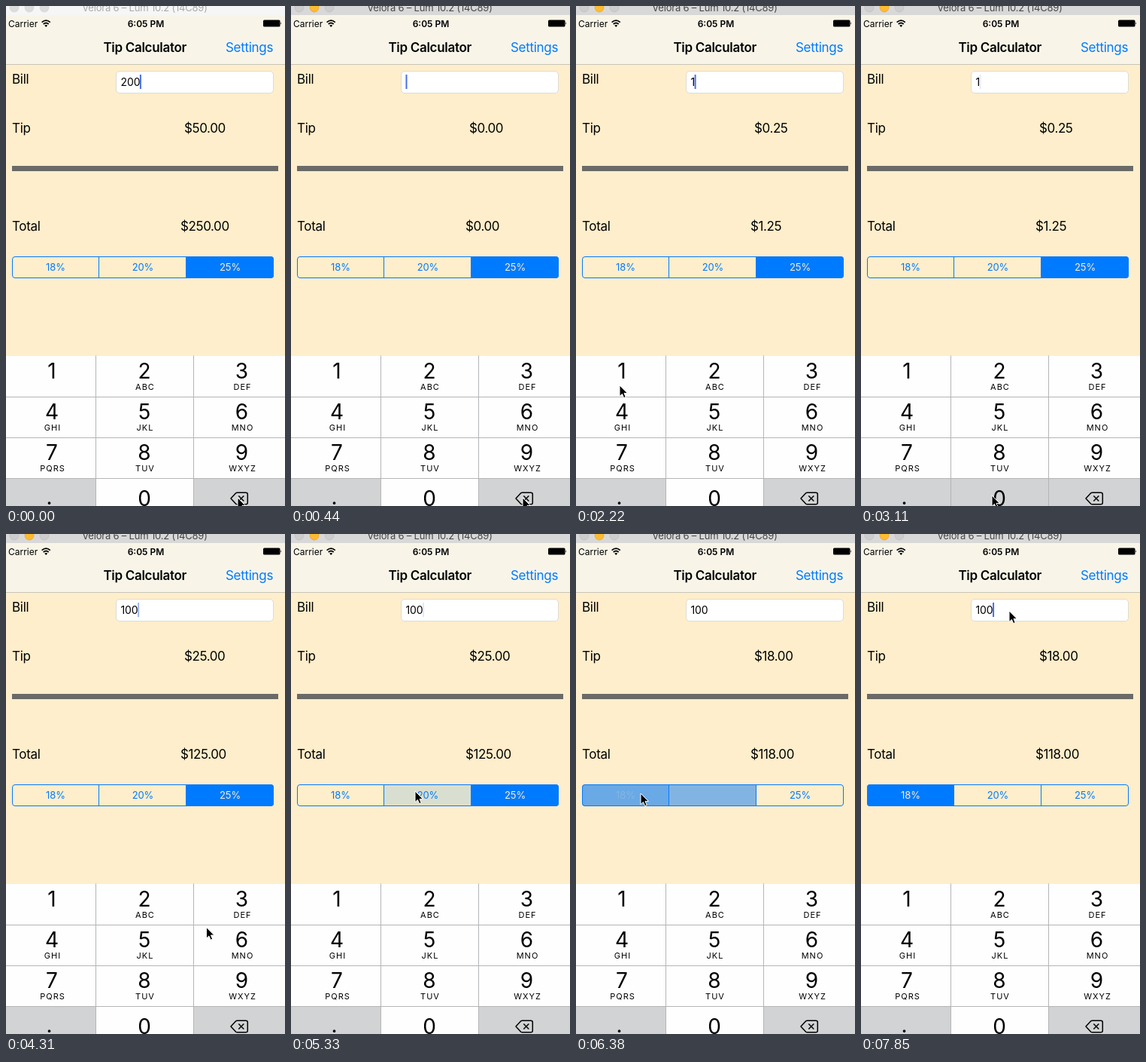
Animation, 371 px wide and 663 px high, one loop 8 s. Source, as an HTML page:

```html
<!DOCTYPE html>
<html lang="en">
<head>
<meta charset="utf-8">
<title>Tip Calculator</title>
<style>
html, body { margin: 0; width: 100%; height: 100%; overflow: hidden; background: #feeecb; }
svg { display: block; width: 371px; height: 663px; }
text { font: 17px Inter, Roboto, sans-serif; letter-spacing: -.3px; fill: #000; white-space: pre; }
.mid { text-anchor: middle; }
#title { font-size: 13px; letter-spacing: -.2px; }
.status { font-size: 12px; letter-spacing: 0; }
.bold { font-weight: 600; }
.money { letter-spacing: -.4px; }
#bill { font-size: 14px; letter-spacing: -.1px; }
.seg { font-size: 13px; letter-spacing: -.1px; }
.digit { font-size: 28px; letter-spacing: 0; }
.letters { font-size: 11px; letter-spacing: 1px; }
</style>
</head>
<body>
<svg viewBox="0 0 371 663">
  <rect width="371" height="663" fill="#feeecb"/>
  <rect id="bar" width="371" height="13"/>
  <g id="dots" stroke-width=".6"></g>
  <text id="title" class="mid" x="184.5" y="7">Velora 6 – Lum 10.2 (14C89)</text>
  <rect y="12" width="371" height="65" fill="#f8f5e8"/>
  <rect y="77" width="371" height="1" fill="#c8c4b5"/>

  <text class="status" x="3" y="27.5">Carrier</text>
  <g fill="none" stroke="#000" stroke-width="1.7">
    <path d="M47.6 21.6Q53.2 16.8 58.8 21.6M49.7 24Q53.2 21 56.7 24"/>
    <path d="M53.2 28L51.2 25.8Q53.2 24.2 55.2 25.8Z" fill="#000" stroke="none"/>
  </g>
  <text class="status bold mid" x="186" y="27.5">6:05 PM</text>
  <rect x="342" y="18.5" width="22.5" height="9" rx="1.5"/>
  <path d="M365.3 21.3q1.8 1.7 0 3.4z"/>
  <text class="bold mid" x="184.7" y="61">Tip Calculator</text>
  <text x="292" y="61" style="fill:#007aff">Settings</text>

  <text x="8" y="103">Bill</text>
  <text x="8" y="168">Tip</text>
  <text x="8" y="298">Total</text>
  <rect x="146.5" y="86.5" width="209" height="29" rx="4.5" fill="#fff" stroke="#dedbd2"/>
  <text id="bill" x="152.5" y="105.5"></text>
  <rect id="caret" y="91" width="2" height="19" fill="#4a6fe3"/>
  <text id="tip" class="money" x="237" y="168"></text>
  <rect x="8" y="212" width="354" height="7" fill="#6b6a68"/>
  <text id="total" class="money" x="232" y="298"></text>

  <clipPath id="round"><rect x="8" y="332" width="348" height="29" rx="4"/></clipPath>
  <g id="segs" clip-path="url(#round)"></g>
  <path d="M123.5 332v29M239.5 332v29" stroke="#007aff"/>
  <rect x="8.5" y="332.5" width="347" height="28" rx="3.5" fill="none" stroke="#007aff"/>

  <g id="keys"></g>
  <path d="M119.5 463.5V663M249.5 463.5V663M0 518.5H371M0 572.5H371M0 626.5H371" stroke="#b4b5b7"/>
  <g fill="none" stroke="#000" stroke-width="1.5" stroke-linejoin="round">
    <path d="M299 653l6.5-7q.8-.8 2-.8H319q2.3 0 2.3 2.3v11q0 2.3-2.3 2.3h-11.5q-1.2 0-2-.8z"/>
    <path d="M309.3 649.5l7 7m0-7l-7 7"/>
  </g>
  <path id="pointer" d="M0 0V14.5L3.4 11.4 5.7 16.6 8.2 15.5 6 10.4H10.4Z" stroke="#fff"/>
</svg>
<script>
const LOOP = 8000, STEPS = 54, STEP = LOOP / STEPS;
const $ = id => document.getElementById(id);
const BLUE = '#007aff', CREAM = '#feeecb';
const DELETE = '⌫';

$('dots').innerHTML = [11, 31, 51].map(x => `<circle cx="${x}" cy="2" r="6"/>`).join('');

const rates = [18, 20, 25];
$('segs').innerHTML = rates.map((r, i) =>
  `<rect x="${8 + 116 * i}" y="332" width="116" height="29"/>` +
  `<text class="seg mid" x="${66 + 116 * i}" y="351">${r}%</text>`).join('');

const labels = [...'123456789.0', DELETE];
const letters = ' ABC DEF GHI JKL MNO PQRS TUV WXYZ'.split(' ');
const keyMid = [61, 184, 313.5];
$('keys').innerHTML = labels.map((label, i) => {
  const col = i % 3, row = i / 3 | 0, x = keyMid[col], y = 54 * row;
  const caption = label === DELETE ? '' : label === '.'
    ? '<text class="digit mid" x="57.5" y="661">.</text>'
    : `<text class="digit mid" x="${x}" y="${label === '0' ? 663 : 494 + y}">${label}</text>`;
  return `<rect x="${125 * col - 5}" y="${464 + y}" width="130" height="54"/>` + caption +
    `<text class="letters mid" x="${x + 1}" y="${509 + y}">${letters[i] || ''}</text>`;
}).join('');
const keyRects = [...$('keys').querySelectorAll('rect')];
keyRects.forEach((k, i) => k.setAttribute('x', [-10, 120, 250][i % 3]));

const segRects = [...$('segs').querySelectorAll('rect')];
const segTexts = [...$('segs').querySelectorAll('text')];
const dots = [...$('dots').children];

// Key and segment taps, in steps; a tap takes effect one step after it starts
const keyTaps = [
  { key: DELETE, down: 0, up: 3 },
  { key: '1', down: 13, up: 15 },
  { key: '0', down: 21, up: 22 },
  { key: '0', down: 25, up: 26 }
];
const segTaps = [{ seg: 1, down: 36 }, { seg: 0, down: 42 }];

// Pointer strokes between rests; "via" bends a stroke
const start = [308, 652];
const strokes = [
  { from: 4, to: 9, end: [58, 503] },
  { from: 16, to: 21, end: [174, 649] },
  { from: 27, to: 35, end: [165, 341], via: [369, 489] },
  { from: 37, to: 42, end: [86, 344] },
  { from: 44, to: 50, end: [197, 102] }
];

const clamp = v => Math.max(0, Math.min(1, v));
const money = v => '$' + v.toFixed(2);

function pointerAt(n) {
  return strokes.reduce((p, { from, to, end, via }) => {
    const u = 1 - (1 - clamp((n - from) / (to - from))) ** 1.8;
    return p.map((a, i) => {
      const mid = via ? via[i] : (a + end[i]) / 2;
      return (1 - u) ** 2 * a + 2 * u * (1 - u) * mid + u * u * end[i];
    });
  }, start);
}

function billAt(n) {
  let text = '200';
  for (const { key, down, up } of keyTaps) {
    if (n <= down) break;
    text = key === DELETE ? text.slice(0, Math.max(0, 3 - Math.min(n, up))) : text + key;
  }
  return text;
}

// Blinks once a second, starting anew when a key is released
function caretAlpha(n) {
  const last = keyTaps.filter(t => t.up <= n).pop();
  const p = (n - (last ? last.up : 0)) * STEP / 1000 % 1;
  return clamp(p < .5 ? (.5 - p) / .11 : (p - .87) / .13);
}

function drawSegments(n, sel, fading) {
  const pressed = segTaps.find(t => t.down === n);
  rates.forEach((r, i) => {
    let fill = i === sel ? BLUE : pressed && i === pressed.seg ? '#d9dfd0' : CREAM;
    let ink = i === sel ? CREAM : BLUE;
    if (fading && i === sel) [fill, ink] = ['#69a9e6', '#86b5df'];
    if (fading && i === sel + 1) fill = ink = '#82b4e3';
    segRects[i].style.fill = fill;
    segTexts[i].style.fill = ink;
  });
}

function draw(n) {
  const active = n > 0;
  $('bar').style.fill = active ? '#d9d8d9' : '#f6f6f6';
  $('title').style.fill = active ? '#464646' : '#a9a9a9';
  dots.forEach((d, i) => {
    const amber = active && i === 1;
    d.style.fill = amber ? '#fdbc2f' : active ? '#cecdce' : '#dcdcdc';
    d.style.stroke = amber ? '#dfa023' : active ? '#bcbbbc' : '#d0d0d0';
  });

  const chosen = segTaps.filter(t => t.down < n).pop();
  const sel = chosen ? chosen.seg : 2;
  const bill = billAt(n), rate = rates[sel] / 100;
  $('bill').textContent = bill;
  $('tip').textContent = money(bill * rate);
  $('total').textContent = money(bill * (1 + rate));
  $('caret').setAttribute('x', 152.5 + (bill ? $('bill').getComputedTextLength() - .5 : 0));
  $('caret').style.opacity = caretAlpha(n);
  drawSegments(n, sel, chosen && n === chosen.down + 1);

  const held = keyTaps.find(t => n > 0 && t.down <= n && n < t.up);
  keyRects.forEach((k, i) => {
    const special = labels[i] === '.' || labels[i] === DELETE;
    const down = held && held.key === labels[i];
    k.style.fill = special !== !!down ? '#d1d3d4' : '#fefefe';
  });
  $('pointer').setAttribute('transform', `translate(${pointerAt(n)})`);
}

function tick() {
  draw(Math.floor((performance.now() + 8) % LOOP / STEP));
  requestAnimationFrame(tick);
}
tick();
</script>
</body>
</html>
```
